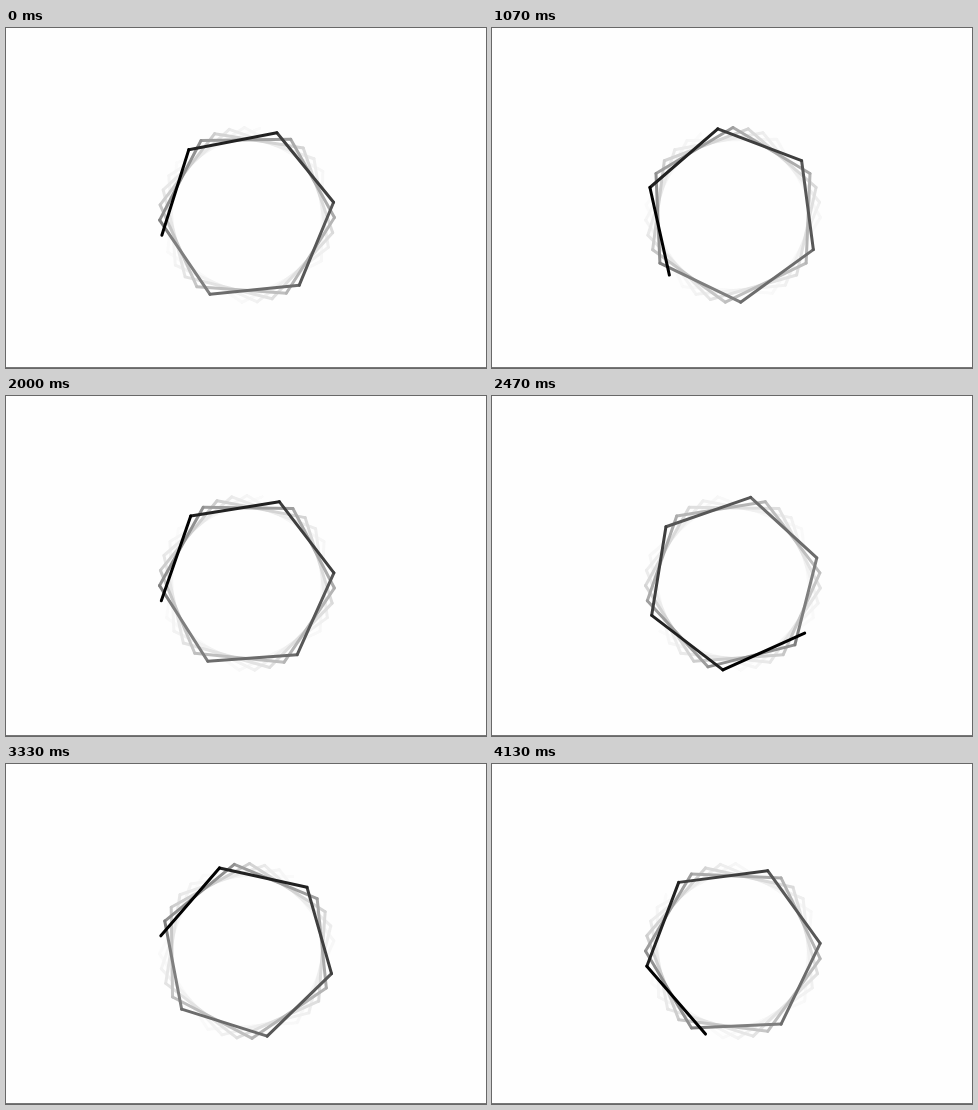
An HTML page with a canvas for the animation above (4190 ms loop, 480 by 340 pixels).

```html
<!DOCTYPE html>
<html lang="en">
<head>
<meta charset="utf-8">
<title>Turning hexagon</title>
<style>
  html, body { margin: 0; width: 100%; height: 100%; overflow: hidden; background: #fefefe; }
  canvas { display: block; }
</style>
</head>
<body>
<canvas id="stage" width="480" height="340"></canvas>
<script>
const ctx = document.getElementById('stage').getContext('2d');
const LOOP = 4190, STEP_MS = 57.7, PHASE = 0.41;
const CX = 241, CY = 187, RADIUS = 87.5;
const START = 166.65, TURN = 370 / 6;   // degrees; each lap of six overshoots by 10
const TRAIL = 30, KEEP = 0.87, PAPER = 254;

// Start of the 15 fps picture on show, rounded to 10 ms.
function pictureTime(t) {
  const index = Math.floor((Math.floor(t / 10) + 0.5) * 0.15);
  return Math.round(index * 20 / 3) * 10;
}

function corner(step) {
  const a = (START - step * TURN) * Math.PI / 180;
  return [CX + RADIUS * Math.cos(a), CY + RADIUS * Math.sin(a)];
}

function draw(t) {
  const step = Math.floor(pictureTime(t) / STEP_MS + PHASE);
  ctx.fillStyle = '#fefefe';
  ctx.fillRect(0, 0, 480, 340);
  ctx.fillStyle = '#777';
  ctx.fillRect(0, 339, 480, 1);

  ctx.lineWidth = 3;
  ctx.lineCap = 'round';
  for (let age = TRAIL; age >= 0; age--) {
    const grey = Math.round(PAPER * (1 - KEEP ** age));
    ctx.strokeStyle = `rgb(${grey},${grey},${grey})`;
    ctx.beginPath();
    ctx.moveTo(...corner(step - age - 1));
    ctx.lineTo(...corner(step - age));
    ctx.stroke();
  }
}

const begin = performance.now();
function tick() {
  draw((performance.now() - begin) % LOOP);
  requestAnimationFrame(tick);
}
tick();
</script>
</body>
</html>
```
